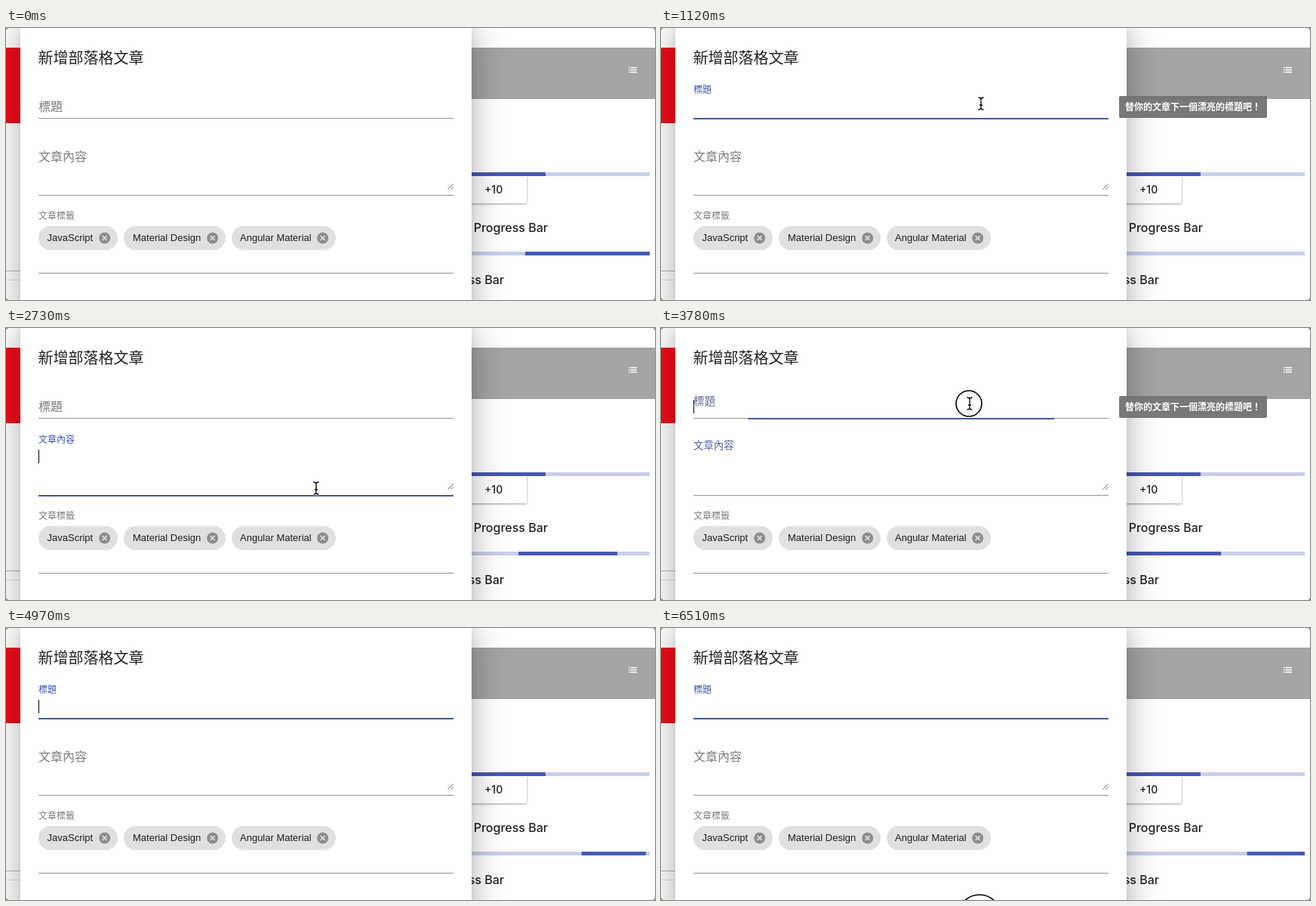
Animation, 860 px wide and 360 px high, one loop 6580 ms. Source, as an HTML page:

```html
<!DOCTYPE html>
<html lang="zh-Hant">
<head>
<meta charset="utf-8">
<style>
html, body { margin: 0; width: 100%; height: 100%; overflow: hidden; background: #fff; }
svg { display: block; width: 860px; height: 360px; }
text { font-family: "Noto Sans CJK TC", "Noto Sans CJK", sans-serif; fill: #7d7d7d; }
.latin { font: 500 16px Inter, sans-serif; fill: #222; }
.chip { font: 13px "Liberation Sans", Arial, sans-serif; fill: #1f1f1f; }
.line { fill: #929292; }
.dark { fill: #4658b2; }
.light { fill: #c9cfea; }
.focus { fill: #45589f; }
</style>
</head>
<body>
<svg viewBox="0 0 860 360">
  <!-- page behind the dialog -->
  <rect y="26" width="40" height="100" fill="#f00c1b"/>
  <rect y="321" width="19" height="1" fill="#b5b5b5"/>
  <rect y="333" width="19" height="1" fill="#e2e2e2"/>
  <rect x="600" y="26" width="260" height="68" fill="#a4a4a4"/>
  <path d="M825 52.5h1.5m1 0h8.5M825 55.5h1.5m1 0h8.5M825 58.5h1.5m1 0h8.5" stroke="#fff" stroke-width="1.3"/>
  <rect class="light" x="508" y="191" width="345" height="5"/>
  <rect class="dark" x="508" y="191" width="207" height="5"/>
  <rect x="600" y="190" width="90" height="42" rx="2" fill="#fff" style="filter:drop-shadow(0 1.5px 1.5px #0006);clip-path:inset(7px -6px -8px 0)"/>
  <text class="latin" x="634" y="219" style="font-size:14px">+10</text>
  <text class="latin" x="718" y="270" text-anchor="end">Indeterminate Progress Bar</text>
  <text class="latin" x="660" y="339" text-anchor="end">Query Progress Bar</text>
  <rect class="light" x="508" y="296" width="345" height="5"/>
  <rect class="dark" id="primary" y="296" height="5"/>
  <rect class="dark" id="secondary" y="296" height="5"/>

  <!-- dialog -->
  <rect x="16" y="8" width="604" height="430" opacity=".14" style="filter:blur(19px)"/>
  <rect x="11" y="-12" width="614" height="440" opacity=".12" style="filter:blur(23px)"/>
  <rect x="26" y="-4" width="584" height="420" opacity=".2" style="filter:blur(7.5px)"/>
  <rect x="19" y="-10" width="598" height="420" fill="#fff"/>
  <text x="42.5" y="47.3" font-size="20" font-weight="500" style="fill:#222">新增部落格文章</text>
  <rect class="line" x="43" y="119" width="550" height="1"/>
  <rect class="line" x="43" y="221" width="550" height="1"/>
  <rect class="line" x="43" y="324" width="550" height="1"/>
  <rect class="focus" id="titleLine" y="119" height="2"/>
  <rect class="focus" id="bodyLine" y="221" height="2"/>
  <text id="titleLabel" x="43">標題</text>
  <text id="bodyLabel" x="43">文章內容</text>
  <text x="43" y="252.6" font-size="12">文章標籤</text>
  <path d="M585.5 213.5l7-7M589.5 213.5l3-3" stroke="#666"/>
  <rect id="caret" x="43" width="1" height="18"/>
  <g id="chips"></g>

  <g id="tip">
    <rect x="607" y="90" width="196" height="29" rx="2" fill="#737373" fill-opacity=".96"/>
    <text x="615" y="108.8" font-size="12" font-weight="700" style="fill:#fff">替你的文章下一個漂亮的標題吧！</text>
  </g>
  <circle id="ring" fill="#fff" fill-opacity=".6" stroke="#000" stroke-width="1.6"/>
  <g id="pointer">
    <g id="beam" fill="none">
      <path d="M-3.5-8q3 0 3.5 2q.5-2 3.5-2M0-6V6M-3.5 8q3 0 3.5-2q.5 2 3.5 2M-2 2h4" stroke="#fff" stroke-width="3"/>
      <path d="M-3.5-8q3 0 3.5 2q.5-2 3.5-2M0-6V6M-3.5 8q3 0 3.5-2q.5 2 3.5 2M-2 2h4" stroke="#000" stroke-width="1.3"/>
    </g>
    <path id="arrow" d="M0 0V15l3.5-3.3 2.4 5.6 2.4-1-2.4-5.4h4.8z" stroke="#fff"/>
  </g>
  <!-- window corners -->
  <path d="M0 0h3L0 3zM860 0h-3l3 3zM0 360h3l-3-3zM860 360h-3l3-3z" fill="#999"/>
</svg>
<script>
const LOOP = 6580, STEP = 70, BLINK = 525;
const $ = id => document.getElementById(id);
const set = (el, attrs) => { for (const k in attrs) el.setAttribute(k, attrs[k]); };
const show = (el, on) => el.style.display = on ? '' : 'none';
const clamp = v => Math.min(1, Math.max(0, v));
const mix = (a, b, k) => a + (b - a) * k;
const smooth = k => k * k * (3 - 2 * k);

function bezier(x1, y1, x2, y2) {
  const at = (a, b, s) => 3 * (1 - s) ** 2 * s * a + 3 * (1 - s) * s * s * b + s ** 3;
  return x => {
    let lo = 0, hi = 1;
    for (let i = 0; i < 24; i++) {
      const mid = (lo + hi) / 2;
      if (at(x1, x2, mid) < x) lo = mid; else hi = mid;
    }
    return at(y1, y2, lo);
  };
}
const swift = bezier(.25, .8, .25, 1);

// keys: [time, value, easing towards the next key]
function track(keys, p) {
  let i = 0;
  while (i < keys.length - 2 && p >= keys[i + 1][0]) i++;
  const [t0, v0, ease] = keys[i], [t1, v1] = keys[i + 1];
  const k = clamp((p - t0) / (t1 - t0));
  return mix(v0, v1, ease ? ease(k) : k);
}

const e1 = bezier(.15, 0, .51506, .40969), e2 = bezier(.31033, .28406, .8, .73371), e3 = bezier(.4, .62704, .6, .90203);
const bars = {
  primary: {
    start: -.9517,
    move: [[0, 0], [.2, 0, bezier(.5, 0, .70173, .49582)], [.5915, .8367, bezier(.30244, .38135, .55, .95635)], [1, 2.0061]],
    size: [[0, .08], [.3665, .08, bezier(.33473, .12482, .78584, 1)], [.6915, .6615, bezier(.06, .11, .6, 1)], [1, .08]]
  },
  secondary: {
    start: -.0489,
    move: [[0, 0, e1], [.25, .3765, e2], [.4835, .8439, e3], [1, 1.6028]],
    size: [[0, .08, e1], [.1915, .4571, e2], [.4415, .728, e3], [1, .08]]
  }
};

function drawBars(t) {
  const p = (.5 + t / 2112) % 1;
  for (const id in bars) {
    const { start, move, size } = bars[id];
    const mid = start + track(move, p), half = track(size, p) / 2;
    const a = clamp(mid - half), b = clamp(mid + half);
    set($(id), { x: 508 + 345 * a, width: 345 * (b - a) });
  }
}

// times at which focus is gained and lost in turn
const fields = {
  title: { toggles: [595, 2240, 3735], y: 104 },
  body: { toggles: [2240, 3735], y: 170 }
};

function drawField(id, t) {
  const { toggles, y } = fields[id];
  const past = toggles.filter(s => s <= t), on = past.length % 2 === 1;
  const age = past.length ? t - past[past.length - 1] : 0;
  const e = past.length ? swift(clamp(age / 420)) : 0;
  const k = on ? e : past.length ? 1 - e : 0;
  const size = mix(16, 12, k);
  const rgb = [[125, 63], [125, 81], [125, 181]].map(([a, b]) => Math.round(mix(a, b, k)));
  const label = $(id + 'Label');
  set(label, { y: y - 23 * k + .38 * size, 'font-size': size });
  label.style.fill = `rgb(${rgb})`;
  const half = 275 * mix(.5, 1, swift(clamp(age / 300)));
  set($(id + 'Line'), { x: 318 - half, width: 2 * half, opacity: on ? clamp(age / 45) : 0 });
  if (on) {
    set($('caret'), { y: y - 9 });
    show($('caret'), Math.floor(age / BLINK) % 2 === 0);
  }
  return on;
}

const outQuad = k => 1 - (1 - k) ** 2, inQuad = k => k * k;
const tipKeys = [[420, 0, outQuad], [570, 1], [1823, 1, inQuad], [1973, 0], [3290, 0, outQuad], [3440, 1], [4430, 1, inQuad], [4580, 0]];
const path = [[70, 452, 372], [510, 424, 100], [1560, 424, 100], [1930, 412, 202], [2000, 412, 202], [2200, 411, 212],
  [2870, 411, 212], [3430, 409, 100], [4270, 409, 100], [4830, 420, 376]];
const along = (axis, t) => track(path.map(p => [p[0], p[axis], smooth]), t);
// clicks: [from, to, radius, x, y]
const clicks = [[560, 700, 17, 424, 100], [2205, 2380, 17, 411, 212], [3700, 3870, 17, 408, 100], [6480, 6580, 28, 422, 381]];

function drawPointer(t) {
  const x = along(1, t), y = along(2, t);
  const overText = (y > 90 && y < 121) || (y > 150 && y < 222);
  set($('pointer'), { transform: `translate(${x} ${y})` });
  show($('pointer'), t >= 70 && t < 4900);
  show($('beam'), overText);
  show($('arrow'), !overText);
  const click = clicks.find(c => t >= c[0] && t < c[1]);
  show($('ring'), click);
  if (click) set($('ring'), { r: click[2], cx: click[3], cy: click[4] });
}

$('chips').innerHTML = [['JavaScript', 43, 105, 54.5], ['Material Design', 156, 135, 168], ['Angular Material', 299, 138, 310]]
  .map(([name, x, w, tx]) => `<rect x="${x}" y="262" width="${w}" height="32" rx="16" fill="#e0e0e0"/>
    <text class="chip" x="${tx}" y="282">${name}</text>
    <circle cx="${x + w - 17.3}" cy="278" r="7.5" fill="#8d8d8d"/>
    <path d="M${x + w - 20.3} 275l6 6m0-6l-6 6" stroke="#e8e8e8" stroke-width="1.5"/>`).join('');

function frame() {
  const t = Math.floor(performance.now() % LOOP / STEP) * STEP;
  drawBars(t);
  const focused = ['title', 'body'].map(id => drawField(id, t));
  if (!focused.includes(true)) show($('caret'), false);
  const s = track(tipKeys, t);
  show($('tip'), s > 0);
  set($('tip'), { transform: `translate(607 104.5) scale(${s}) translate(-607 -104.5)` });
  drawPointer(t);
  requestAnimationFrame(frame);
}
frame();
</script>
</body>
</html>
```
